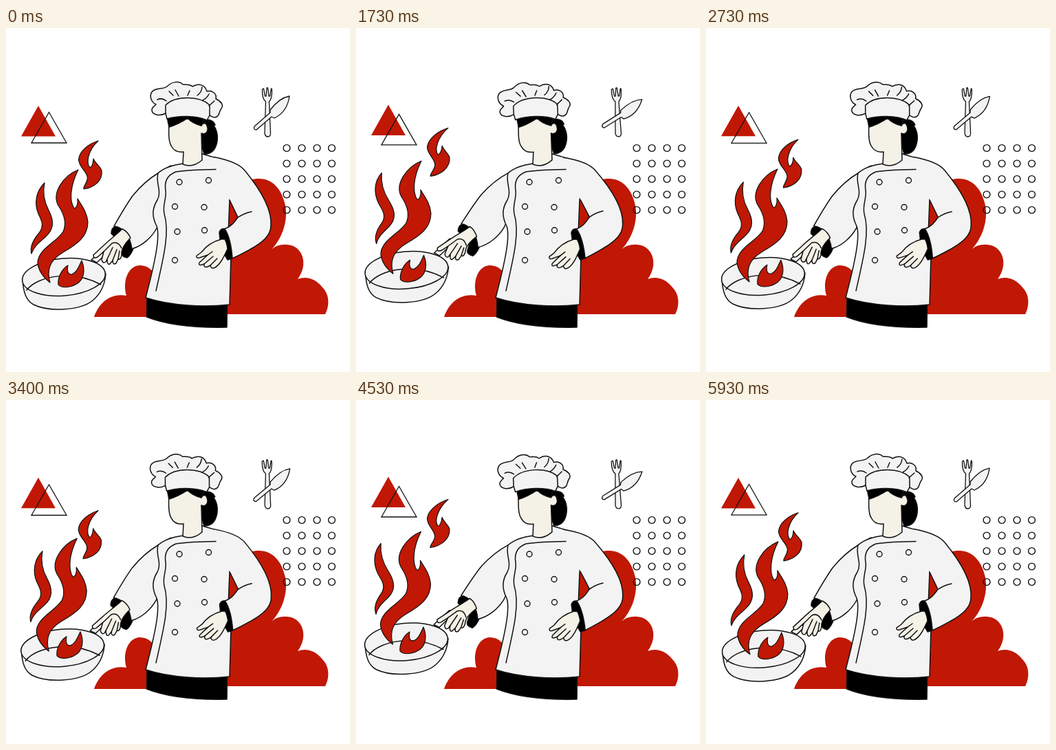
Recreate the animation shown at these times as an HTML page without scripts. Size 500 by 500 pixels, loop 5990 ms.

```html
<!DOCTYPE html>
<html lang="en">
<head>
<meta charset="utf-8">
<title>Chef at the pan</title>
<style>
@property --m { syntax: '<number>'; inherits: true; initial-value: 0; }
@property --odd { syntax: '<number>'; inherits: true; initial-value: 0; }

html, body { margin: 0; width: 100%; height: 100%; overflow: hidden; background: #fff; }

/* --n counts 30 held poses; --p is the even sway, --q the quick rise and slow fall of the fire */
svg {
  display: block; width: 100vw; height: 100vh;
  --n: calc(2 * var(--m) + var(--odd));
  --p: calc((1 - cos(var(--n) * 12deg)) / 2);
  --q: calc((1 - cos((min(var(--n), 11) / 11 + max(0, var(--n) - 11) / 19) * 180deg)) / 2);
  animation: pair 2995ms steps(15) infinite, half 199.6667ms step-end infinite;
}
@keyframes pair { from { --m: 0; } to { --m: 15; } }
@keyframes half { 0% { --odd: 0; } 65%, 100% { --odd: 1; } }

.move { transform: translate(calc(var(--p) * var(--x) * 1px), calc(var(--p) * var(--y) * 1px)) skewX(calc(var(--p) * var(--lean, 0) * 1deg)); }
.turn { transform: rotate(calc(var(--p) * var(--r) * 1deg)); }
.rise { transform: translateY(calc(var(--q) * var(--up) * 1px)); }

.line, .cloth, .skin, .fire, .ink {
  stroke: #111; stroke-width: 1.5; stroke-linecap: round; stroke-linejoin: round;
}
.line { fill: none; }
.cloth { fill: #f3f3f3; }
.skin { fill: #f4f1e7; }
.ink { fill: #000; }
.fire { fill: #c01804; stroke-width: 1.2; }
.red { fill: #c01804; }

.outline { --x: 0; --y: 3; }
.solid { --x: 0; --y: -1.5; }
.fork { --r: -2; transform-origin: 380px 125px; }
.knife { --r: 9; transform-origin: 382px 126px; }
.pan { --x: -11; --y: -10.5; }
.hat { --r: -3; transform-origin: 264px 178px; }
.bun { --r: -2; transform-origin: 268px 190px; }
.face { --r: -.7; transform-origin: 270px 195px; }
.left { --r: 3.2; transform-origin: 222px 211px; }
.hand { --r: 6; transform-origin: 175px 300px; }
.right { --r: -1.8; transform-origin: 325px 200px; }
.top { --x: -5; --y: -19.5; --lean: -4; transform-origin: 113px 234px; }
.tall { --x: -10.5; --y: 0; --up: -16.5; }
.thin { --x: -6; --y: 0; --lean: 6.6; --up: -18.5; transform-origin: 37px 328px; }
.low { --x: -12; --y: -8; }
</style>
</head>
<body>
<svg viewBox="0 0 500 500" xmlns="http://www.w3.org/2000/svg">
  <!-- clouds -->
  <g class="red">
    <path d="M300 416H464C470 405 471 388 460 377C450 364 436 360 424 365C441 342 430 316 409 315C399 314 391 317 386 322C403 304 410 278 406 258C401 234 387 219 368 219C350 219 330 228 300 240Z"/>
    <path d="M128 420C136 397 154 385 175 389C169 369 177 346 194 345C203 345 210 349 214 355L212 420Z"/>
  </g>

  <!-- triangles -->
  <path class="red solid move" d="M47 113L22 157.500H72Z"/>
  <path class="line outline move" style="stroke-width:1.300;stroke-linejoin:miter" d="M62.500 122.500L37 167H88Z"/>

  <!-- ring grid -->
  <defs>
    <g id="row" class="line" style="stroke-width:1.400">
      <circle cx="408" cy="174.500" r="4.900"/><circle cx="430" cy="174.500" r="4.900"/>
      <circle cx="452" cy="174.500" r="4.900"/><circle cx="473.500" cy="174.500" r="4.900"/>
    </g>
  </defs>
  <use href="#row"/><use href="#row" y="22.500"/><use href="#row" y="45"/><use href="#row" y="67.500"/><use href="#row" y="90"/>

  <!-- cutlery -->
  <path class="cloth fork turn" style="stroke-width:1.300" d="M372.500 89Q372 103 377.500 107L376 153Q377 158 380.500 158Q384.500 158 384.500 153L382.500 107Q387 103 386.500 89L385.500 88L383.500 99H382L380.500 87H379L378 99H376.500L374.500 88Z"/>
  <path class="cloth knife turn" style="stroke-width:1.300" d="M361 143Q359 148 364 148L386 129L390 131C403 125 410 113 412 99C401 101 391 110 384 119L384 123Z"/>

  <!-- pan -->
  <g class="pan move">
    <path class="cloth" d="M24 364C25 384 29 396 40 402C62 413 108 411 126 396C138 386 144 371 145 357Z"/>
    <ellipse class="cloth" cx="84" cy="362" rx="60.500" ry="27" transform="rotate(-5 84 362)"/>
    <path class="line" d="M30 381C46 360 98 351 138 373"/>
    <path class="cloth" d="M124 337L147 316L153 321L132 341Z"/>
  </g>

  <!-- fire -->
  <g class="thin move"><path class="fire thin rise" d="M56 225C53 240 55 252 62 265C70 280 70 292 58 303C48 312 40 318 37 328C34 316 42 305 48 298C56 288 52 280 47 270C41 255 43 238 56 225Z"/></g>
  <g class="tall move"><path class="fire tall rise" d="M105 206C83 215 66 240 76 258C84 270 89 283 83 296C73 312 46 321 46 342C48 356 56 364 64 370C59 352 63 338 83 326C104 314 119 303 119 282C118 268 110 258 104 248C105 257 102 262 99 262C92 252 93 230 105 206Z"/></g>
  <path class="fire low move" d="M110 338C115 350 115 366 101 373C91 378 80 378 76 373C75 364 80 351 90 345C88 355 91 359 96 358C104 354 106 346 110 338Z"/>
  <path class="fire top move" d="M134 164C121 168 107 178 105.500 191C106 203 118 208 118.500 218C118 226 112 230 113 234C128 232 141 222 139 207C137 201 130 197 127 190C127 196 125 202 122 203C116 196 119 178 134 164Z"/>

  <!-- pan arm -->
  <g class="left turn">
    <path class="ink" d="M153 299Q153 288 163 288L178 296L186 318Q182 330 176 334Q167 332 168 326L171 316Z"/>
    <path class="cloth" d="M240 200C232 204 226 208 221 211C206 220 193 233 184 244C174 258 165 274 157 288C170 289 181 303 183 321C198 317 212 304 219 291L236 250Z"/>
    <g class="skin hand turn">
      <path d="M169 292C160 301 149 309 141 317L127 330Q127 336 133 333L142 325L139 337Q141 343 145 340L147 336Q147 345 151 343L155 338Q155 345 160 342L163 336Q167 337 168 330C167 321 173 313 181 305Q177 296 169 292Z"/>
      <path class="line" d="M142 325L154 313M147 336L155 319M155 338L161 322M163 336L165 324M154 313Q163 309 168 320"/>
    </g>
  </g>

  <!-- jacket -->
  <path class="ink" d="M205 391L204.500 420C232 431 272 436 321 435L321.500 401Z"/>
  <path class="cloth" d="M258 197C242 199 230 203 221 211C217 225 227 237 220 250C211 264 213 276 219 288C224 302 218 335 203 392C240 404 288 406 325 402L327 330L323 300L325 250L335 200C318 191 300 188 286 183Z"/>
  <path class="line" d="M305 205.500C285 206 263 206 247 209C234 214 230 224 232 236C234 246 227 258 230 270C238 296 230 330 218 382"/>
  <g class="cloth" style="stroke-width:1.400">
    <circle cx="252" cy="224" r="4"/><circle cx="294.500" cy="221.500" r="4"/>
    <circle cx="245.500" cy="259.500" r="4"/><circle cx="288" cy="260.500" r="4"/>
    <circle cx="249" cy="296" r="4"/><circle cx="288.500" cy="294" r="4"/>
    <circle cx="245.500" cy="337.500" r="4"/>
  </g>

  <!-- resting arm -->
  <g class="right turn">
    <path class="cloth" d="M302 187.500C320 191 338 196 347 207C365 229 387 261 385 287C385 302 372 312 356 321C345 327 336 332 328 335C327 318 322 302 313 293C325 291 331 284 337 275L325 250"/>
    <path class="line" d="M336 276Q346 269 357 267"/>
    <path class="ink" d="M310 297Q312 291 318 292Q327 306 329 335L322 337L318 330L320 318L311 307Z"/>
    <path class="skin" d="M313 307C298 311 290 318 284 326L277 331Q276 335 281 334L293 330L281 341Q279 346 285 344L288 343Q287 349 293 347L297 345Q298 351 304 348C312 343 317 332 322 321Q321 312 318 307Z"/>
    <path class="line" d="M293 330L300 325M288 343L301 332M297 345L307 335"/>
  </g>

  <!-- head -->
  <path class="ink bun turn" d="M287 134C296 132 302 135 304 141L302 142C308 150 309 162 305 172C302 180 295 184 288 183C283 170 283 150 287 134Z"/>
  <g class="face turn">
    <path class="skin" d="M237 125C237 145 235 163 240 171C244 179 251 181 258 180L257 198Q271 204 285 192L284 153C291 156 295 149 292 142C291 137 286 138 284 142L285 120Z"/>
    <path class="ink" d="M234 129L288 129L284 142Q271 139 264 131Q250 140 237 144Z"/>
  </g>
  <g class="hat turn">
    <path class="cloth" d="M234 132L232 124C223 129 212 126 212 119C212 115 217 113 218 111C211 108 208 99 212 93C217 86 228 90 234 85C242 77 252 77 257 82C262 83 266 81 271 85C280 80 289 82 292 92C299 90 307 95 305 103C312 106 317 112 313 117C309 122 311 129 303 130C300 130 298 128 296 127L292 134C276 127 250 127 234 132Z"/>
    <path class="line" d="M232 124L232 112C246 98 281 98 296 112L296 127M220 104Q227 101 233 106M237 92L243 98M246 90L251 99M267 91L264 98M285 86Q284 94 278 98M295 96Q292 102 286 105M303 106L295 113"/>
  </g>
</svg>
</body>
</html>
```
